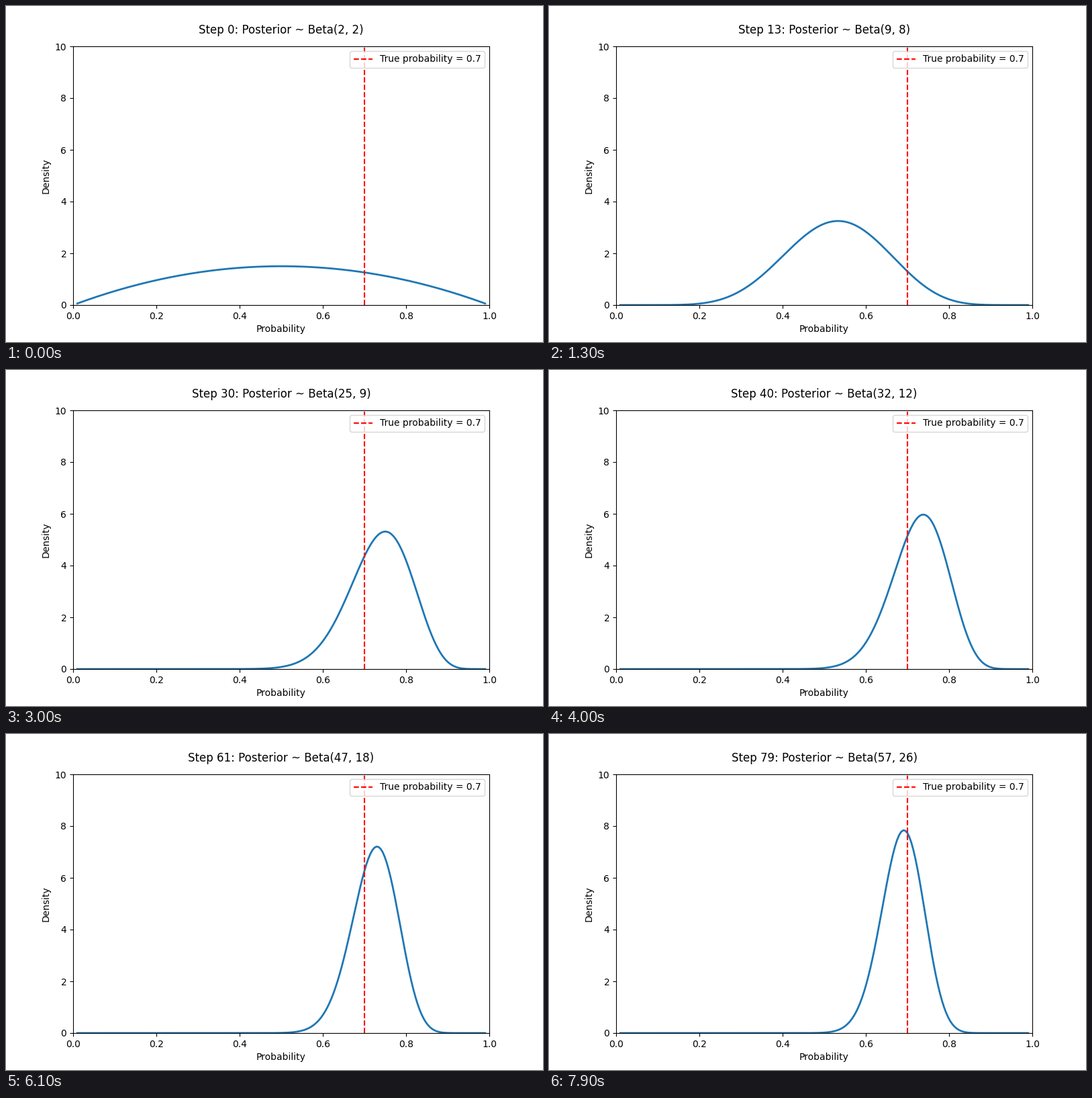
A matplotlib script that plays this animation: 800 by 500 pixels, repeating every 8000 ms.

```python
import math

import matplotlib.pyplot as plt
import numpy as np
from matplotlib.animation import FuncAnimation

STEPS = 80
TRUE_P = 0.7
PRIOR = 2

# Running success counts of a biased coin
flips = np.random.RandomState(42).rand(STEPS) < TRUE_P
wins = np.concatenate([[0], np.cumsum(flips)])

x = np.linspace(0.01, 0.99, 200)


def beta_pdf(a, b):
    log_norm = math.lgamma(a + b) - math.lgamma(a) - math.lgamma(b)
    return np.exp(log_norm + (a - 1) * np.log(x) + (b - 1) * np.log(1 - x))


fig, ax = plt.subplots(figsize=(8, 5), dpi=100)
ax.set(xlim=(0, 1), ylim=(0, 10), xlabel="Probability", ylabel="Density")
curve, = ax.plot([], [], lw=2)
ax.axvline(TRUE_P, color="red", ls="--", label=f"True probability = {TRUE_P}")
ax.legend(loc="upper right")
title = ax.text(0.5, 1.05, "", transform=ax.transAxes, ha="center", fontsize=12)


def update(step):
    a = PRIOR + int(wins[step])
    b = PRIOR + step - int(wins[step])
    curve.set_data(x, beta_pdf(a, b))
    title.set_text(f"Step {step}: Posterior ~ Beta({a}, {b})")
    return curve, title


anim = FuncAnimation(fig, update, frames=STEPS, interval=100, repeat=True)
plt.show()
```
